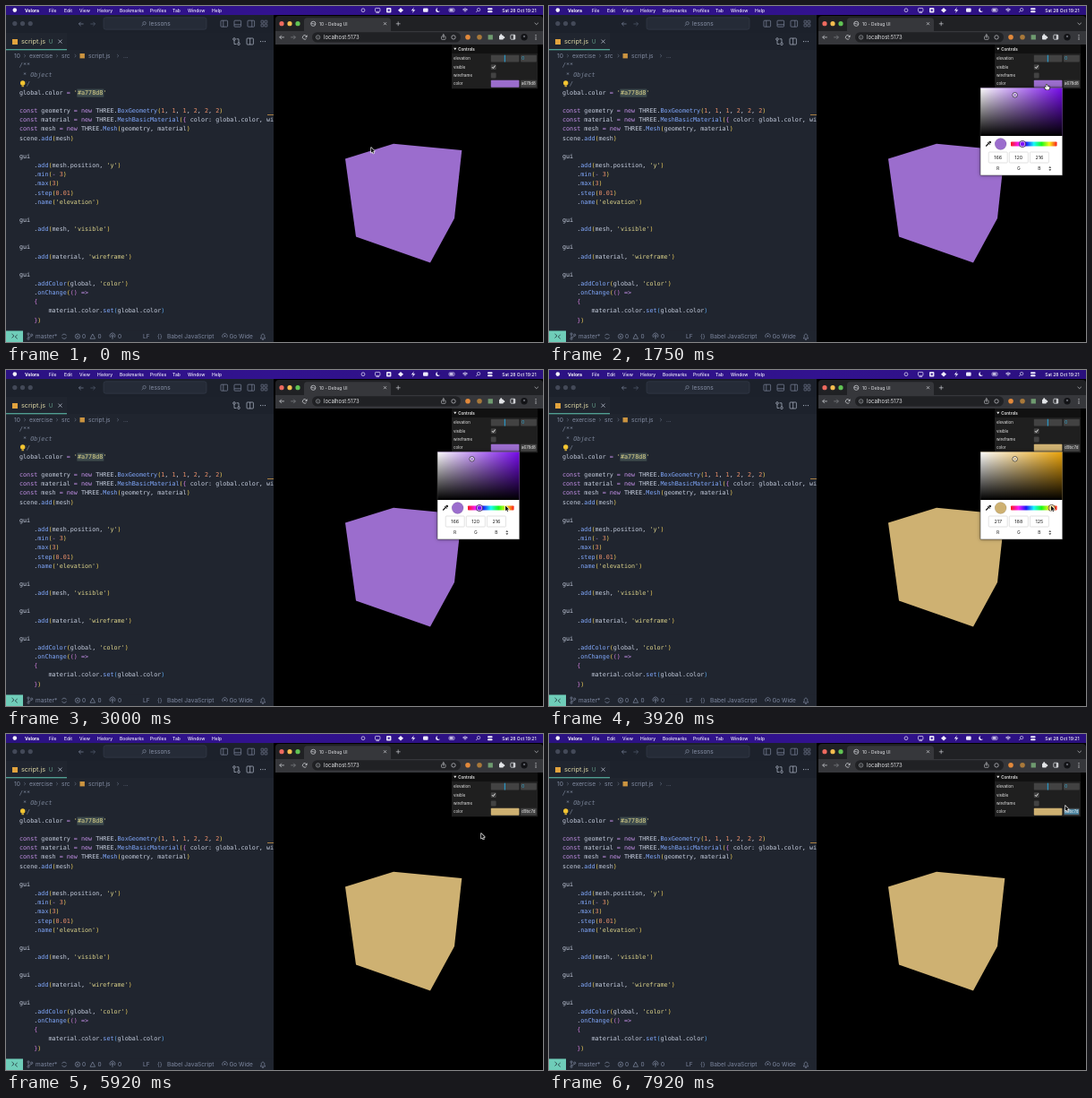
Recreate the animation shown at these times as an HTML page with a canvas. Size 600 px wide and 375 px high, loop 8000 ms.

```html
<!DOCTYPE html>
<html lang="en">
<head>
<meta charset="utf-8">
<title>Debug UI</title>
<style>
html, body { margin: 0; width: 100%; height: 100%; overflow: hidden; background: #000; }
canvas { display: block; width: 600px; height: 375px; }
</style>
</head>
<body>
<canvas id="stage"></canvas>
<script>
const LOOP = 8000;
const canvas = document.getElementById('stage');
const ctx = canvas.getContext('2d');
const dpr = window.devicePixelRatio || 1;
canvas.width = 600 * dpr;
canvas.height = 375 * dpr;

const SANS = 'Inter, Roboto, sans-serif';
const MONO = '"DejaVu Sans Mono", "Liberation Mono", monospace';
const GREY = '#8790a6';

// Drawing helpers

function rect(x, y, w, h, color, r = 0) {
  ctx.fillStyle = color;
  ctx.beginPath();
  ctx.roundRect(x, y, w, h, r);
  ctx.fill();
}

function frame(x, y, w, h, color, width = 0.7, r = 0.8) {
  ctx.strokeStyle = color;
  ctx.lineWidth = width;
  ctx.beginPath();
  ctx.roundRect(x, y, w, h, r);
  ctx.stroke();
}

function dot(x, y, r, color) {
  ctx.fillStyle = color;
  ctx.beginPath();
  ctx.arc(x, y, r, 0, Math.PI * 2);
  ctx.fill();
}

function ring(x, y, r, color, width = 0.7, from = 0, to = Math.PI * 2) {
  ctx.strokeStyle = color;
  ctx.lineWidth = width;
  ctx.beginPath();
  ctx.arc(x, y, r, from, to);
  ctx.stroke();
}

function trace(points) {
  ctx.beginPath();
  points.forEach(([x, y], i) => i ? ctx.lineTo(x, y) : ctx.moveTo(x, y));
}

function line(points, color, width = 0.7) {
  trace(points);
  ctx.strokeStyle = color;
  ctx.lineWidth = width;
  ctx.stroke();
}

function poly(points, color) {
  trace(points);
  ctx.closePath();
  ctx.fillStyle = color;
  ctx.fill();
}

function text(str, x, y, size, color, { weight = 400, align = 'left', family = SANS } = {}) {
  ctx.font = `${weight} ${size}px ${family}`;
  ctx.textAlign = align;
  ctx.textBaseline = 'alphabetic';
  ctx.fillStyle = color;
  ctx.fillText(str, x, y);
}

function cross(x, y, r, color) {
  line([[x - r, y - r], [x + r, y + r]], color);
  line([[x + r, y - r], [x - r, y + r]], color);
}

function chevron(x, y, color, r = 1.6) {
  line([[x - r / 2, y - r], [x + r / 2, y], [x - r / 2, y + r]], color, 0.6);
}

function arrow(x, y, dir, color) {
  line([[x - 2.6, y], [x + 2.6, y]], color);
  line([[x + dir * 0.4, y - 2.2], [x + dir * 2.6, y], [x + dir * 0.4, y + 2.2]], color);
}

function magnifier(x, y, color) {
  ring(x + 0.6, y - 0.6, 1.7, color, 0.6);
  line([[x - 0.7, y + 0.7], [x - 2.3, y + 2.3]], color);
}

function reload(x, y, r, color) {
  ring(x, y, r, color, 0.75, 0.5, 5.6);
  poly([[x + r + 0.5, y - r - 0.3], [x + r + 0.5, y - 0.2], [x + r - 1.9, y - 0.2]], color);
}

// Menu bar

function menuBar() {
  const bg = ctx.createLinearGradient(0, 0, 600, 0);
  bg.addColorStop(0, '#2b1282');
  bg.addColorStop(0.5, '#32128f');
  bg.addColorStop(1, '#2a107e');
  rect(0, 0, 600, 10, bg);
  dot(9.8, 4.6, 2.3, '#f2f0fa');
  text('Velora', 21, 6.5, 5.1, '#fff', { weight: 700 });
  const items = { File: 48, Edit: 65, View: 82, History: 102, Bookmarks: 127,
    Profiles: 161, Tab: 186, Window: 203, Help: 230 };
  for (const name in items) text(name, items[name], 6.5, 5, '#f3f0ff', { weight: 500 });

  const white = '#eeeaff';
  ring(399, 4.7, 1.9, white);
  frame(412.5, 2.4, 5.4, 4, white);
  line([[413.5, 7.6], [417, 7.6]], white);
  rect(425, 2, 5.4, 5.4, '#e8e4f8', 1);
  rect(426.6, 3.6, 2.2, 2.2, '#40219a');
  poly([[441, 2], [444, 4.7], [441, 7.4], [438, 4.7]], '#f0ecff');
  poly([[455.8, 1.6], [452.8, 5.2], [455, 5.2], [454, 8], [457.3, 4.2], [455, 4.2]], white);
  rect(466, 2.6, 5.6, 4.2, white, 1);
  dot(482.5, 4.7, 2.4, white);
  dot(483.7, 3.8, 2.1, '#2c117f');
  frame(495, 2.8, 6, 3.6, white, 0.6, 1);
  rect(495.8, 3.6, 3.8, 2, white, 0.4);
  for (const r of [1.3, 2.7, 4]) ring(513, 7, r, white, 0.8, -2.35, -0.8);
  magnifier(527.5, 4.7, white);
  rect(538, 2.2, 5.6, 2, white, 1);
  rect(538, 5.2, 5.6, 2, white, 1);
  text('Sat 28 Oct 19:21', 592.5, 6.5, 5, '#fff', { weight: 500, align: 'right' });
}

// Editor

const CODE = `/**
 * Object
 */
global.color = '#a778d8'

const geometry = new THREE.BoxGeometry(1, 1, 1, 2, 2, 2)
const material = new THREE.MeshBasicMaterial({ color: global.color, wi
const mesh = new THREE.Mesh(geometry, material)
scene.add(mesh)

gui
    .add(mesh.position, 'y')
    .min(- 3)
    .max(3)
    .step(0.01)
    .name('elevation')

gui
    .add(mesh, 'visible')

gui
    .add(material, 'wireframe')

gui
    .addColor(global, 'color')
    .onChange(() =>
    {
        material.color.set(global.color)
    })`.split('\n');
const CHAR = 4.058;
const ROW = 10.15;
const TOKEN = /'[^']*'|\b(?:const|new)\b|\d+(?:\.\d+)?|\w+(?=\()|\w+|[(){}]|=>|[=-]|\s+|./g;
const BRACKETS = ['#f0cf5a', '#cf7ddb', '#5aa9f0'];

function tokenColor(token, rest) {
  if (token[0] === "'") return '#dfd68c';
  if (/^(const|new|=>|=|-)$/.test(token)) return '#c490e8';
  if (/^\d/.test(token)) return '#f0936c';
  if (/^\w/.test(token) && rest[0] === '(') return '#82aaff';
  return '#c6cedf';
}

function code() {
  rect(15 + 17 * CHAR - 4.6, 92.6, CHAR * 7 + 1.5, 9, '#3d4a4c');
  const style = { family: MONO };
  let depth = 0;
  CODE.forEach((row, i) => {
    const y = 68.4 + i * ROW;
    if (i < 3) {
      text(row, 15, y, 6.74, '#7d879b', { family: MONO, weight: 'italic 400' });
      return;
    }
    for (const match of row.matchAll(TOKEN)) {
      const token = match[0];
      if (!token.trim()) continue;
      let color = tokenColor(token, row.slice(match.index + token.length));
      if ('({'.includes(token)) color = BRACKETS[depth++ % 3];
      if (')}'.includes(token)) color = BRACKETS[Math.max(0, --depth) % 3];
      text(token, 15 + match.index * CHAR, y, 6.74, color, style);
    }
    if (!row) depth = 0;
    if (i === 6) depth = 0;
  });
  rect(16, 83, 6, 8, '#20252f');
  dot(18.7, 86, 2.7, '#f4c531');
  rect(17.5, 88.7, 2.5, 1.5, '#c9a43a');
  rect(292, 121, 7, 0.9, '#b98a45');
}

function editorTop() {
  rect(0, 10, 299, 20, '#1c212b');
  for (const x of [9.8, 18.5, 27.2]) dot(x, 19.6, 2.6, '#434958');
  arrow(84, 20, -1, '#7c869c');
  arrow(97, 20, 1, '#555e72');
  rect(109, 12.8, 115, 13.4, '#252b37', 2.5);
  frame(109, 12.8, 115, 13.4, '#363e4d', 0.6, 2.5);
  magnifier(154, 19.8, GREY);
  text('lessons', 160, 22, 6.6, GREY);
  for (const x of [240, 255, 270]) frame(x, 16.2, 7.6, 7, '#8089a0');
  line([[242.8, 16.2], [242.8, 23.2]], '#8089a0');
  line([[255, 20.8], [262.6, 20.8]], '#8089a0');
  line([[274.8, 16.2], [274.8, 23.2]], '#8089a0');
  for (const [x, y] of [[285, 16.2], [289, 16.2], [285, 20.2], [289, 20.2]]) {
    frame(x, y, 2.8, 2.8, '#8089a0', 0.6, 0.3);
  }

  rect(0, 30, 299, 19, '#1d222c');
  rect(0, 30, 68, 19, '#20252f');
  rect(0, 48.3, 68, 0.9, '#62c9b4');
  rect(7, 37, 6, 6, '#e2a33d');
  text('script.js', 17, 42, 7.3, '#d9d3a2');
  text('U', 48, 41.7, 5.8, '#6aa991');
  cross(60.5, 39.6, 2, '#c8cede');
  const icon = '#b3bacb';
  ring(255, 37, 1.3, icon);
  ring(260, 42.3, 1.3, icon);
  line([[255, 38.3], [255, 42.5], [257.5, 42.5]], icon);
  line([[260, 41], [260, 36.8], [257.5, 36.8]], icon);
  frame(269, 36, 7.4, 7, icon);
  line([[272.7, 36], [272.7, 43]], icon);
  for (const x of [284.5, 287, 289.5]) dot(x, 39.6, 0.6, icon);

  const crumbs = { 10: 9, exercise: 26, src: 62, 'script.js': 92, '...': 131 };
  for (const name in crumbs) text(name, crumbs[name], 57.8, 6.6, '#838ca2');
  for (const x of [21, 57, 77.5, 125]) chevron(x, 55.6, '#737c91');
  rect(82.5, 53, 5.4, 5.4, '#cb9440');
}

function statusBar() {
  rect(0, 362.5, 299, 12.5, '#20252f');
  rect(0, 362.5, 19, 12.5, '#6fcdb9');
  line([[6.5, 366], [9, 368.2], [6.5, 370.4]], '#23313a', 0.8);
  line([[12.7, 367], [10.2, 369.2], [12.7, 371.4]], '#23313a', 0.8);
  const c = '#7e88a0';
  ring(25, 366, 1.1, c);
  ring(25, 371.3, 1.1, c);
  ring(28.7, 367.2, 1.1, c);
  line([[25, 367.1], [25, 370.2]], c);
  line([[28.7, 368.3], [25.4, 370.2]], c);
  text('master*', 33, 371.1, 6.5, c);
  ring(65, 368.8, 2.6, c, 0.7, 0.3, 2.8);
  ring(65, 368.8, 2.6, c, 0.7, 3.5, 5.9);
  ring(80, 368.7, 2.7, c);
  cross(80, 368.7, 1.1, c);
  text('0', 85, 371.1, 6.5, c);
  line([[96.8, 366], [94, 371.3], [99.6, 371.3], [96.8, 366]], c);
  text('0', 102.5, 371.1, 6.5, c);
  line([[119, 372], [119, 368.5]], c);
  ring(119, 368, 1.2, c);
  ring(119, 368, 3, c, 0.7, 2.4, 7);
  text('0', 125, 371.1, 6.5, c);
  text('LF', 153, 371.1, 6.5, c);
  text('{}', 169, 371.1, 6.5, c);
  text('Babel JavaScript', 180, 371.1, 6.6, c);
  dot(244.5, 368.4, 0.9, c);
  ring(244.5, 368.4, 2.8, c, 0.7, 2.4, 7);
  text('Go Wide', 249.5, 371.1, 6.5, c);
  line([[284.2, 371], [285.2, 369.5], [285.2, 367.4], [287, 365.8], [288.8, 367.4],
    [288.8, 369.5], [289.8, 371], [284.2, 371]], c);
  dot(287, 372.2, 0.8, c);
}

function editor() {
  rect(0, 10, 299, 365, '#20252f');
  editorTop();
  ctx.save();
  ctx.beginPath();
  ctx.rect(0, 60, 299, 302);
  ctx.clip();
  code();
  ctx.restore();
  statusBar();
}

// Browser

function browser() {
  rect(301, 11, 299, 32, '#202124', [4, 4, 0, 0]);
  [[308, '#ee6a5f'], [317, '#f5bd4f'], [326, '#61c454']].forEach(([x, c]) => dot(x, 19.7, 2.6, c));
  rect(333, 13.2, 97, 16, '#36373b', [3.5, 3.5, 0, 0]);
  ring(343.3, 19.8, 2.6, '#c9cbd0', 0.8);
  line([[340.9, 19.2], [345.8, 20.4]], '#c9cbd0', 0.7);
  text('10 - Debug UI', 350, 21.6, 4.9, '#e4e5e8');
  cross(423.5, 19.7, 1.5, '#d2d4d8');
  line([[435.8, 19.8], [440.6, 19.8]], '#c6c8cd');
  line([[438.2, 17.4], [438.2, 22.2]], '#c6c8cd');
  line([[590.6, 18.8], [592.7, 20.7], [594.8, 18.8]], '#c6c8cd');

  rect(301, 28, 299, 15, '#36373b');
  arrow(308.3, 34.9, -1, '#d5d7db');
  arrow(320.8, 34.9, 1, '#85878c');
  reload(333.7, 34.9, 2.3, '#d5d7db');
  rect(342, 29.2, 166, 11.4, '#202124', 5.7);
  ring(348.6, 34.9, 2.2, '#b8babf', 0.6);
  dot(348.6, 34.9, 0.5, '#b8babf');
  text('localhost:5173', 355, 37, 5.9, '#e4e5e8');
  frame(486.5, 33.8, 4.6, 3.6, '#c6c8cd', 0.6);
  line([[488.8, 35.8], [488.8, 31.6]], '#c6c8cd', 0.6);
  line([[487.6, 32.7], [488.8, 31.5], [490, 32.7]], '#c6c8cd', 0.6);
  ring(500, 34.9, 2.2, '#c6c8cd');
  dot(516, 34.8, 2.8, '#e2893b');
  dot(529, 34.8, 2.8, '#a9793a');
  rect(538.6, 32.2, 5.3, 5.3, '#6f9b70');
  rect(551, 32.8, 4.8, 4.8, '#e3e5e8', 0.8);
  dot(553.2, 32.4, 1.1, '#e3e5e8');
  dot(556.2, 35.2, 1.1, '#e3e5e8');
  frame(563.8, 32.2, 5, 5, '#d5d7db', 0.8);
  rect(566.8, 32.2, 2, 5, '#d5d7db');
  dot(579, 34.8, 3.7, '#121316');
  dot(579, 33.9, 1.2, '#5e6168');
  for (const y of [32.6, 34.8, 37]) dot(592, y, 0.65, '#d5d7db');
}

// State over time

const START = { hue: 268.8, s: 0.4444, v: 0.847 };
const END = { hue: 41.09, s: 0.424, v: 0.851 };
const PICK = 3330, PICK_END = 3780, OPEN = 1500, CLOSE = 5250, SELECT = 7150;
const PATH = [
  [0, 408, 158], [250, 408, 158], [1200, 555.5, 87.5], [1850, 555.5, 87.5],
  [2550, 546, 146], [3000, 558, 151.5], [3330, 558.5, 151.5], [3780, 561, 151.5],
  [4250, 561, 151.5], [4850, 469, 137.5], [5400, 469, 137.5], [6400, 585.5, 87.5],
  [6950, 585.5, 87.5], [7400, 576.8, 80], [8000, 576.8, 80]
];

const clamp = v => Math.min(1, Math.max(0, v));
const ease = k => k * k * (3 - 2 * k);

function pointerAt(t) {
  const i = PATH.findIndex(p => p[0] > t);
  const [t0, x0, y0] = PATH[i - 1];
  const [t1, x1, y1] = PATH[i];
  const k = ease((t - t0) / (t1 - t0));
  return [x0 + (x1 - x0) * k, y0 + (y1 - y0) * k];
}

function colorAt(t) {
  if (t < PICK) return START;
  return { ...END, hue: END.hue + 14 * (1 - ease(clamp((t - PICK) / (PICK_END - PICK)))) };
}

function toRgb({ hue, s, v }) {
  return [5, 3, 1].map(n => {
    const k = (n + hue / 60) % 6;
    return Math.round(255 * v * (1 - s * Math.max(0, Math.min(k, 4 - k, 1))));
  });
}

// Scene and panel

function cube(color) {
  poly([[379, 170.5], [433, 153.8], [509.3, 161], [501, 237], [474, 286.5], [391, 257.5]], color);
}

function panel(color, hex, selected) {
  rect(498, 43, 96, 49.3, '#1f1f1f');
  rect(498, 43, 96, 10, '#111');
  poly([[500.2, 46.8], [503.4, 46.8], [501.8, 49.3]], '#ebebeb');
  text('Controls', 505.3, 49.8, 4.5, '#ebebeb', { weight: 600 });
  ['elevation', 'visible', 'wireframe', 'color'].forEach((name, i) =>
    text(name, 500, 60.1 + i * 9.45, 4.4, '#ebebeb'));
  rect(541.8, 54.7, 31.6, 7.8, '#424242', 0.8);
  rect(556.8, 54.7, 1.1, 7.8, '#2a9fd0');
  rect(575, 54.7, 17.8, 7.8, '#424242', 0.8);
  text('0', 576.2, 60.2, 4.4, '#2cb5e6');
  rect(541.8, 65.2, 5.8, 5.8, '#424242', 0.8);
  line([[543, 68.2], [544.3, 69.5], [546.6, 66.5]], '#fff', 0.9);
  rect(541.8, 74.6, 5.8, 5.8, '#424242', 0.8);
  rect(541.8, 82.8, 31.6, 7.9, color, 0.8);
  rect(575, 82.8, 17.8, 7.9, '#424242', 0.8);
  if (selected) rect(575.8, 83.8, 16.2, 5.9, '#4d86a3');
  text(hex, 576, 88.3, 4.4, '#ebebeb');
}

function picker(state, rgb, color) {
  const x = 482, y = 91.3, w = 91.7, h = 53.7;
  ctx.save();
  ctx.shadowColor = 'rgba(0,0,0,.5)';
  ctx.shadowBlur = 4;
  rect(x, y, w, 97.7, '#fff');
  ctx.restore();

  rect(x, y, w, h, `hsl(${state.hue} 92% 48%)`);
  const light = ctx.createLinearGradient(x, 0, x + w, 0);
  light.addColorStop(0, '#fff');
  light.addColorStop(1, 'rgba(255,255,255,0)');
  rect(x, y, w, h, light);
  const dark = ctx.createLinearGradient(0, y, 0, y + h);
  dark.addColorStop(0, 'rgba(0,0,0,0)');
  dark.addColorStop(1, '#000');
  rect(x, y, w, h, dark);
  frame(x, y, w, 97.7, '#3a3a3a', 0.5, 0);
  ring(520.6, 99.3, 2.7, '#222', 0.8);
  ring(520.6, 99.3, 2, '#fff', 0.7);

  line([[488.2, 156.6], [491.2, 153.4]], '#222', 1.4);
  line([[490.2, 152.2], [492.6, 154.6]], '#222', 1);
  dot(492.7, 152.1, 1.4, '#222');
  dot(504.6, 154, 6.5, color);
  ring(504.6, 154, 6.5, 'rgba(0,0,0,.25)', 0.4);

  const hues = ctx.createLinearGradient(516, 0, 567.5, 0);
  for (let i = 0; i <= 6; i++) hues.addColorStop(i / 6, `hsl(${360 - i * 60} 95% 54%)`);
  rect(516, 151.4, 51.5, 5.2, hues, 0.8);
  const thumb = 516 + 51.5 * (1 - state.hue / 360);
  dot(thumb, 154, 3.6, `hsl(${state.hue} 95% 52%)`);
  ring(thumb, 154, 3.6, '#33303a', 0.8);
  ring(thumb, 154, 2.8, '#fff', 0.6);

  rgb.forEach((value, i) => {
    const left = 491.2 + i * 23.1;
    frame(left, 163, 21, 12, '#cfcfcf', 0.6, 0.8);
    text(value, left + 10.5, 170.9, 5.4, '#222', { align: 'center' });
    text('RGB'[i], left + 10.5, 183.3, 5, '#222', { align: 'center' });
  });
  poly([[558.4, 180.7], [561.2, 180.7], [559.8, 179]], '#333');
  poly([[558.4, 182.2], [561.2, 182.2], [559.8, 183.9]], '#333');
}

function pointer(t, [x, y]) {
  const hand = (t > 1100 && t < 1950) || (t > 4600 && t < 5600);
  const shape = hand
    ? [[0, 0], [1, 0], [1.2, 1.9], [3.6, 2.4], [3.8, 4.2], [2.9, 6], [0, 6], [-2, 3.6], [-1.5, 2.8], [-0.2, 3.6]]
    : [[0, 0], [0, 5.7], [1.3, 4.6], [2.2, 6.6], [3.1, 6.2], [2.2, 4.2], [4, 4.1]];
  const points = shape.map(([dx, dy]) => [x + dx, y + dy]);
  trace(points);
  ctx.closePath();
  ctx.lineJoin = 'round';
  ctx.lineWidth = 1.2;
  ctx.strokeStyle = hand ? '#111' : '#fff';
  ctx.stroke();
  poly(points, hand ? '#fff' : '#111');
}

function draw(t) {
  ctx.setTransform(dpr, 0, 0, dpr, 0, 0);
  rect(0, 0, 600, 375, '#000');
  menuBar();
  editor();
  browser();

  const state = colorAt(t);
  const rgb = toRgb(state);
  const hex = rgb.map(v => v.toString(16).padStart(2, '0')).join('');
  const color = `rgb(${rgb.map(v => v - 11).join()})`;
  cube(color);
  panel(color, hex, t >= SELECT);
  if (t >= OPEN && t < CLOSE) picker(state, rgb, color);
  pointer(t, pointerAt(t));
}

function tick() {
  draw(performance.now() % LOOP);
  requestAnimationFrame(tick);
}
tick();
</script>
</body>
</html>
```
